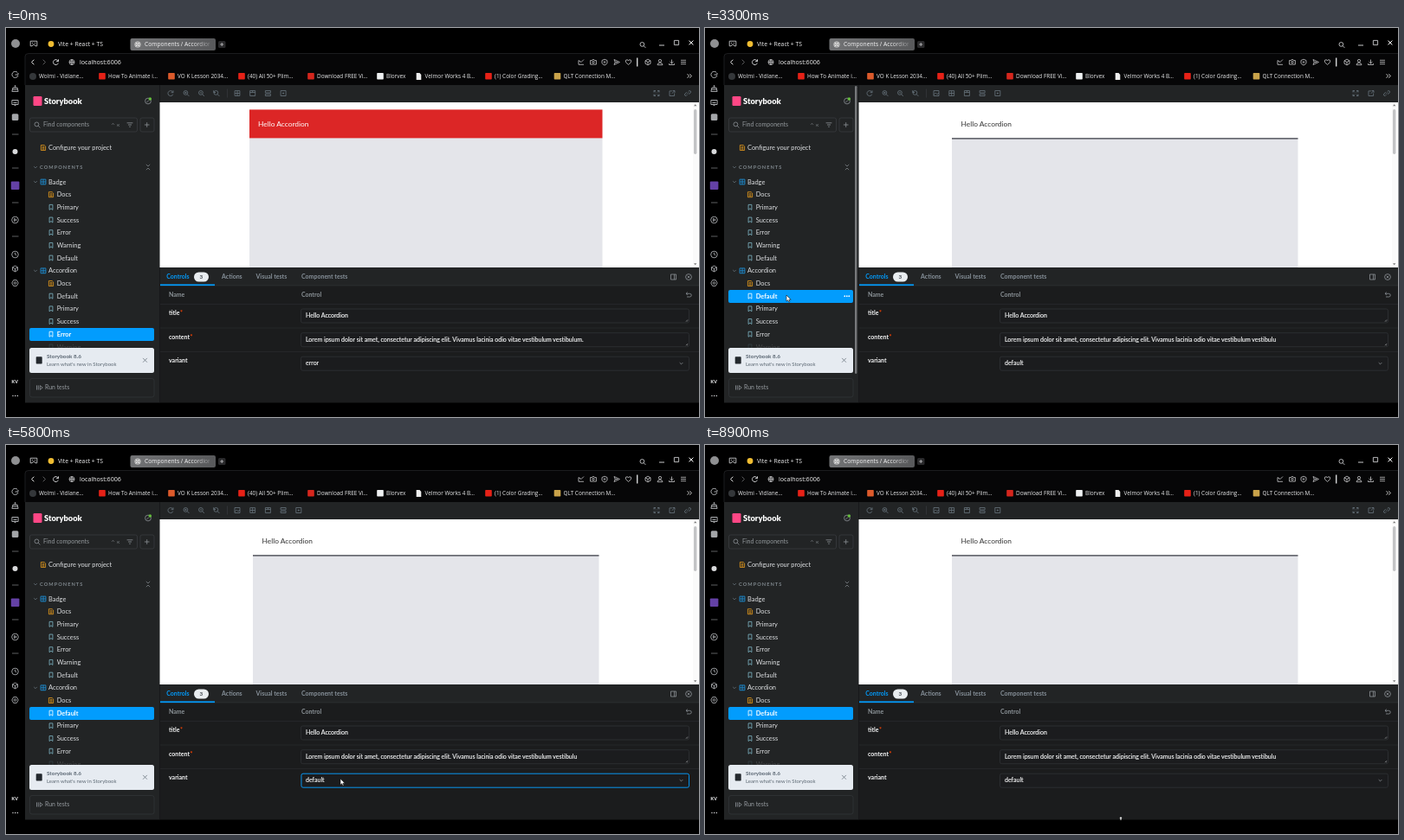
Write an HTML page that moves like this. It is 800x450 px and loops after 9 s.

```html
<!DOCTYPE html>
<html lang="en">
<head>
<meta charset="utf-8">
<title>Accordion stories</title>
<style>
html, body { margin: 0; width: 100%; height: 100%; overflow: hidden; background: #000; }
svg { display: block; width: 800px; height: 450px; font-family: Lato, "Open Sans", sans-serif; }
text { white-space: pre; }
.ui { font-family: "Open Sans", "Noto Sans", sans-serif; }
.b { font-weight: 700; }
.h { font-weight: 900; }
.m { stroke: #f4f5f6; stroke-width: .16px; }
.bar { animation: slide 9s infinite; }
.flash { animation: flash 9s infinite; }
.cursor { animation: move 9s infinite; }
@keyframes slide {
  0%, 71.4% { transform: translateY(21px); animation-timing-function: ease; }
  74.73%, 100% { transform: none; }
}
@keyframes flash {
  0%, 71.4% { fill: #14405f; animation-timing-function: ease; }
  93.6%, 100% { fill: #222425; }
}
</style>
</head>
<body>
<svg id="stage" viewBox="0 0 800 450" xmlns="http://www.w3.org/2000/svg"></svg>
<script>
const LOOP = 9000;
const BLUE = '#029cfd', GREY = '#8d9297', DIM = '#69757e', PANEL = '#222425', LINE = '#303336', WHITE = '#f4f5f6';

// Visible spans as start, end pairs in ms
const spans = {
  error: [0, 3100],
  story: [3100, 9000],
  plain: [3100, 6400, 8200, 9000],
  green: [6400, 8200],
  focus: [5700, 8200],
  urlHover: [1250, 1500],
  rowHover: [3000, 3800],
  scroll: [2700, 3900],
  tabHover: [4600, 5100],
  save: [6420, 8200],
  resetHover: [7650, 8200],
  arrow: [1000, 4450, 5150, 6250, 6750, 7600, 8250, 8750],
  hand: [4450, 5150, 7600, 8250],
  ibeam: [6250, 6750],
  upTip: [8750, 9000]
};

// Pointer stops: ms, x, y
const stops = [
  [0, 372, -12], [1000, 372, -12], [1400, 336.5, 52.5], [1800, 318, 78], [2950, 94, 309],
  [3500, 94, 309], [4600, 369, 286.5], [5000, 369, 286.5], [5550, 386, 386], [5900, 386, 386],
  [6350, 386, 352], [6700, 386, 352], [7700, 779, 426], [8200, 779, 426], [8800, 480, 431], [9000, 480, 431]
];

const pct = ms => (ms / LOOP * 100).toFixed(3) + '%';

function spanRule(name) {
  const marks = spans[name];
  let steps = marks[0] ? '0%{opacity:0}' : '';
  marks.forEach((ms, i) => { if (ms < LOOP) steps += `${pct(ms)}{opacity:${1 - i % 2}}`; });
  steps += `100%{opacity:${marks.at(-1) === LOOP ? 1 : 0}}`;
  return `@keyframes ${name}{${steps}} .${name}{animation:${name} 9s step-end infinite}`;
}

const moveRule = `@keyframes move{${stops.map(([ms, x, y]) =>
  `${pct(ms)}{transform:translate(${x}px,${y}px);animation-timing-function:ease-in-out}`).join('')}}`;

const style = document.createElement('style');
style.textContent = Object.keys(spans).map(spanRule).join('\n') + moveRule;
document.head.append(style);

const rect = (x, y, w, h, fill, r = 0, more = '') =>
  `<rect x="${x}" y="${y}" width="${w}" height="${h}" rx="${r}" fill="${fill}" ${more}/>`;
const box = (x, y, w, h, stroke, r = 2, fill = 'none') => rect(x, y, w, h, fill, r, `stroke="${stroke}" stroke-width=".8"`);
const dot = (x, y, r, fill) => `<circle cx="${x}" cy="${y}" r="${r}" fill="${fill}"/>`;
const text = (x, y, s, size, fill, cls = '', more = '') =>
  `<text x="${x}" y="${y + size * .34}" font-size="${size}" fill="${fill}" class="${cls}" ${more}>${s}</text>`;
const icon = (x, y, d, c = GREY, w = .8) =>
  `<path transform="translate(${x} ${y})" d="${d}" fill="none" stroke="${c}" stroke-width="${w}"/>`;
const group = (cls, ...parts) => `<g class="${cls}">${parts.join('')}</g>`;

const ring = r => `M${-r} 0a${r} ${r} 0 1 1 ${2 * r} 0a${r} ${r} 0 1 1 ${-2 * r} 0`;
const square = r => `M${-r} ${-r}H${r}V${r}H${-r}Z`;
const D = {
  lens: 'M-3 -.6a2.4 2.4 0 1 1 4.8 0a2.4 2.4 0 1 1 -4.8 0M1.2 1.2L3.4 3.4',
  reload: 'M2.8 -1A3 3 0 1 0 2.8 1.2M3 -3.2V-.8H.6',
  globe: ring(3) + 'M-3 0H3M0 -3Q-2.6 0 0 3Q2.6 0 0 -3',
  cross: 'M-2.4 -2.4L2.4 2.4M2.4 -2.4L-2.4 2.4',
  plus: 'M-2.8 0H2.8M0 -2.8V2.8',
  down: 'M-1.8 -.9L0 .9L1.8 -.9',
  grid: square(2.9) + 'M-2.9 0H2.9M0 -2.9V2.9',
  doc: 'M-2.6 -3H1.2L2.6 -1.6V3H-2.6ZM-1.3 -.9H1.3M-1.3 .4H1.3M-1.3 1.6H1.3',
  mark: 'M-1.9 -3H1.9V3L0 1.4L-1.9 3Z',
  frame: square(3) + 'M-3 -1H3M0 -3V-1',
  rows: 'M-3 -3H3V-.6H-3ZM-3 .8H3V3H-3Z',
  picture: square(3) + 'M-3 1.8L-.8 -.4L1 1.2L3 -.4',
  outline: square(3) + 'M-1 0H1M0 -1V1',
  cube: 'M0 -3.4L3 -1.7V1.7L0 3.4L-3 1.7V-1.7ZM-3 -1.7L0 0L3 -1.7M0 0V3.4',
  undo: 'M-1.2 -2.8L-3 -1.2L-1.2 .4M-3 -1.2H1.4A1.8 1.8 0 0 1 1.4 2.5H-2',
  expand: 'M-3 -3L-1 -1M3 -3L1 -1M-3 3L-1 1M3 3L1 1M-3 -1V-3H-1M3 -1V-3H1M-3 1V3H-1M3 1V3H1',
  open: 'M0 -2.6H-3V3H2.6V0M.6 -3H3V-.6M3 -3L-.4 .4',
  link: 'M-.6 1.8L-1.8 3A1.7 1.7 0 0 1 -3.4 .8L-1.2 -1.2M.6 -1.8L1.8 -3A1.7 1.7 0 0 1 3.4 -.8L1.2 1.2M-1 1L1 -1'
};

function browser() {
  const c = '#c9cacc';
  let s = rect(0, 0, 800, 450, '#000') + rect(22, 30, 778, 36, '#060607') +
    icon(0, 0, 'M22 66V33Q22 29.5 26 29.5H800', '#28292b', .7);

  // Tab strip
  s += dot(11, 18, 5, '#8f9092') + icon(32, 18, 'M-3.8 -2.8H3.8V2.8H1.8L.8 1.2H-.8L-1.8 2.8H-3.8ZM-2 -.6H-.8M1 -.6H2', c, .9) +
    dot(52, 18.5, 3.4, '#f0bd32') + text(60, 19, 'Vite + React + TS', 6.85, '#f0f0f1', 'ui') +
    rect(143.5, 12, 98.5, 14, 'url(#tab)', 2) + dot(152, 19, 3.5, '#f2f2f2') + icon(152, 19, D.globe, '#777', .5) +
    `<g clip-path="url(#tabClip)">${text(160, 19, 'Components / Accordion', 6.7, 'url(#fade)', 'ui')}</g>` +
    rect(245, 15, 8.5, 8, '#29292b', 1.5) + icon(249.2, 19, 'M-2 0H2M0 -2V2', c) +
    icon(735, 19.5, D.lens, c, .9) + icon(757, 19, 'M-3 1H3', c, 1) + icon(774, 17, square(2.6), c, .9) + icon(791, 17, D.cross, '#fff', 1);

  // Address row
  s += group('urlHover', rect(68, 32.5, 590, 13.5, '#141416', 3)) +
    icon(31, 39.5, 'M1.3 -2.8L-1.5 0L1.3 2.8', '#e2e2e2', 1) + icon(44, 39.5, 'M-1.3 -2.8L1.5 0L-1.3 2.8', '#68696b', .9) +
    icon(57.5, 39.5, D.reload, c, 1) + icon(76, 39.5, D.globe, c, .8) + text(85, 39.5, 'localhost:6006', 7.1, '#f6f6f6', 'ui');
  [[664, 'M-3 2.8V-2L0 0L3 -3M-3 2.8H3'], [678, 'M-3.4 -2H-1.4L-.8 -3H.8L1.4 -2H3.4V2.6H-3.4Z' + ring(1.2)],
   [691, 'M0 -3.3L3 -2V1Q2 3 0 3.5Q-2 3 -3 1V-2Z' + ring(.8)], [705, 'M-3 -3L3.4 0L-3 3L-1.8 0ZM-1.8 0H1'],
   [718.5, 'M0 3L-3 0Q-4 -3 -1.4 -2.8Q-.3 -2.5 0 -1.5Q.3 -2.5 1.4 -2.8Q4 -3 3 0Z'], [741, D.cube],
   [755, 'M-1.6 -1.6a1.6 1.6 0 1 1 3.2 0a1.6 1.6 0 1 1 -3.2 0M-3 3.2Q-2.6 .6 0 .6Q2.6 .6 3 3.2Z'],
   [768.5, 'M0 -3V1.4M-2 -.4L0 1.5L2 -.4M-3 1.6V3H3V1.6'], [782, 'M-3 -2.2H3M-3 0H3M-3 2.2H3']
  ].forEach(([x, d]) => s += icon(x, 39.5, d, c, .8));
  s += rect(728, 34.5, 1.4, 10, '#d5d6d8');

  // Bookmarks
  [[31, '#34373a', 'Wolmi - Vidlane...'], [111, '#e62117', 'How To Animate i...'], [191, '#dc5a2b', 'VO K Lesson 2034...'],
   [272, '#e62117', '(40) All 50+ Plim...'], [352, '#d5261d', 'Download FREE Vi...'], [432, '#eef0f1', 'Blorvex'],
   [476.5, '', 'Velmor Works 4 B...'], [557, '#e62117', '(1) Color Grading...'], [636.5, '#c9a34a', 'QLT Connection M...']
  ].forEach(([x, fill, label], i) => {
    s += !fill ? `<path d="M${x - 2.8} 52H${x + 1}L${x + 2.8} 54V60H${x - 2.8}Z" fill="#eee"/>`
      : i ? rect(x - 3.8, 52, 7.6, 7.6, fill, .8) : dot(x, 56, 4, fill);
    s += text(x + 7, 56, label, 6.4, '#e8e9ea', 'ui');
  });
  s += icon(789, 55.5, 'M-2.4 -2.2L-.4 0L-2.4 2.2M.4 -2.2L2.4 0L.4 2.2', '#ddd', .9);

  // Side strip
  const k = '#a9abae';
  s += icon(10.5, 54, 'M2.8 -2.4A3.6 3.6 0 1 0 3.5 1M0 0H3.5V-2', k, 1) +
    icon(10.5, 70, 'M0 -4V-1M-2.5 -1H2.5L3.6 3.4H-3.6ZM-3 1H3', k, 1) +
    icon(10.5, 86.5, 'M-3.6 -3H3.6V2H-3.6ZM-2 0H2M-1 2L0 3.6L1 2', k, 1) +
    rect(6.8, 99.3, 7.6, 7.6, '#a4a6a9', 1.5) + dot(10.5, 143, 3, '#d8d9db') + rect(5.8, 177.5, 9.6, 9.6, '#6441a5', 1) +
    icon(10.5, 222, ring(3.8) + 'M-1 -1.6L1.7 0L-1 1.6Z', k, .9) + icon(10.5, 262, ring(3.8) + 'M0 -2.2V0L1.7 1', k, .9) +
    icon(10.5, 278.5, D.cube, k, .9) + icon(10.5, 295, 'M-1.8 -3.4H1.8L3.7 0L1.8 3.4H-1.8L-3.7 0Z' + ring(1.3), k, .9) +
    text(6.3, 409, 'KV', 5.8, '#d4d5d7', 'ui b');
  [123, 162, 202, 241].forEach(y => s += rect(7, y - .4, 7.5, .8, '#77797c'));
  [8, 10.7, 13.4].forEach(x => s += dot(x, 425.5, .75, '#d0d1d3'));
  return s;
}

function row(i, label, kind, on) {
  const y = 178 + 14.69 * i;
  if (kind === 'group')
    return icon(34, y, D.down, DIM) + icon(43, y, D.grid, '#1c9ae8') + text(49, y, label, 7.45, '#dfe1e4');
  const tint = on ? '#fff' : kind === 'doc' ? '#e89b1b' : '#7fb9c8';
  return (on ? rect(27, Math.round(y - 7.2), 144, 15, BLUE, 2) : '') + icon(52, y, D[kind], tint) +
    text(58.7, y, label, 7.45, on ? '#fff' : '#dfe1e4', on ? 'b' : '');
}

function sidebar() {
  let s = rect(22, 66, 155.5, 367.5, PANEL) + rect(31.5, 79, 10, 11, '#ff4785', 1.2) + text(44, 84.5, 'Storybook', 9.3, '#fff', 'h') +
    icon(164, 84.5, ring(3.4) + 'M-1.5 1.5L1 -1', GREY) + dot(166.3, 82, 1.8, '#66bf3c');
  s += box(27.5, 104, 124, 16, '#393c3f') + box(155, 104, 16, 16, '#393c3f') + icon(36, 112, D.lens, GREY) +
    text(43, 112, 'Find components', 7, '#92979b') + icon(123.5, 111, 'M-1.4 .8L0 -.7L1.4 .8', GREY, .6) + text(128.3, 112, 'K', 4.6, GREY) +
    icon(143, 112, 'M-3.4 -2.2H3.4M-2 0H2M-.8 2.2H.8', GREY) + icon(162.7, 112, D.plus, GREY);
  s += icon(43, 138.5, D.doc, '#e89b1b') + text(49, 138.5, 'Configure your project', 7.45, '#dfe1e4') +
    icon(34, 161, D.down, DIM) + text(39, 161, 'COMPONENTS', 5.7, '#7f878d', 'b', 'letter-spacing="1"') +
    icon(164, 161, 'M-2.2 -3.2L0 -1L2.2 -3.2M-2.2 3.2L0 1L2.2 3.2', GREY, .7);

  const badge = ['Docs', 'Primary', 'Success', 'Error', 'Warning', 'Default'];
  const accordion = ['Docs', 'Default', 'Primary', 'Success', 'Error'];
  const kind = i => i ? 'mark' : 'doc';
  s += row(0, 'Badge', 'group') + badge.map((n, i) => row(i + 1, n, kind(i))).join('') +
    row(7, 'Accordion', 'group') + accordion.map((n, i) => row(i + 8, n, kind(i))).join('') +
    `<g opacity=".18">${row(13, 'Warning', 'mark')}</g>`;
  s += group('error', row(12, 'Error', 'mark', true)) + group('story', row(9, 'Default', 'mark', true)) +
    group('rowHover', ...[161.3, 163.8, 166.3].map(x => dot(x, 310.2, .85, '#fff'))) +
    group('scroll', rect(173, 67, 2.4, 333, '#77797b', 1.2));

  s += rect(27, 370, 144, 29, '#e6ebf1', 2.5) + rect(34.7, 380.2, 7, 8.3, '#23282d', .8) +
    text(47, 380, 'Storybook 8.6', 6.4, '#5a6672', 'b') + text(47, 389, 'Learn what\'s new in Storybook', 6, '#5c6873') +
    icon(160.5, 384.3, D.cross, '#6d7680', .8);
  s += box(27.5, 405.5, 143.5, 21.5, '#323538', 2.5, '#212324') +
    icon(38.5, 416, 'M-3 -2.6V2.6M-1.2 -2.6V2.6M.8 -2.4L3.8 0L.8 2.4Z', GREY) + text(45, 416, 'Run tests', 6.9, '#979ca1');
  return s + rect(177, 66, 1, 367.5, '#17181a');
}

const tools = list => list.map((name, i) => icon(267 + i * 17.7, 75.5, D[name], DIM)).join('');

function preview() {
  const card = (x, w) => rect(x, 127, w, 150, '#e4e5ea');
  const title = (x, fill) => text(x, 111.5, 'Hello Accordion', 8.4, fill);
  let s = rect(178, 66, 622, 20, PANEL) + icon(190, 75.5, D.reload, DIM) +
    icon(208, 75.5, D.lens + 'M-1.7 -.6H.5M-.6 -1.7V.5', DIM) + icon(225.5, 75.5, D.lens + 'M-1.7 -.6H.5', DIM) +
    icon(243, 75.5, D.lens + 'M-3.3 -3.3V-1H-1', DIM) + rect(255, 70.5, .7, 10, '#383b3e') +
    icon(751, 75.5, D.expand, DIM) + icon(769, 75.5, D.open, DIM) + icon(787, 75.5, D.link, DIM) +
    rect(177.5, 86, 622.5, 191, '#fff');
  s += group('error', tools(['grid', 'frame', 'rows', 'outline']), card(281, 407.5), rect(281, 94.4, 407.5, 33, '#dc2626'), title(291, '#fff')) +
    group('story', tools(['picture', 'grid', 'frame', 'rows', 'outline']), card(285, 399.5)) +
    group('plain', rect(285, 94, 399.5, 33.5, '#fff'), rect(285, 127.3, 399.5, 1.2, '#30323b'), title(295.5, '#333')) +
    group('green', rect(285, 94.4, 399.5, 33, '#17a34a'), title(295.5, '#fff'));
  return s + rect(793, 86, 5.5, 191, '#fafafa') + rect(794, 94, 3.4, 52, '#c3c4c6', 1.7) +
    '<path d="M794 90.3h3.4l-1.7-2zM794 272.3h3.4l-1.7 2z" fill="#777"/>';
}

function panel() {
  const field = (y, grip) => box(340.5, y, 448, 16, LINE, 2, '#1b1c1e') +
    (grip ? icon(787, y + 14.5, 'M-2 0L0 -2M-.8 0L0 -.8', '#b5b8ba', .6) : '');
  const value = (y, s) => text(346, y, s, 7, WHITE, 'm');
  const lorem = 'Lorem ipsum dolor sit amet, consectetur adipiscing elit. Vivamus lacinia odio vitae vestibulum vestibulu';
  let s = rect(178, 277, 622, 156.5, '#1b1c1d') + rect(178, 277, 622, 21, PANEL) + rect(178, 297.6, 622, .7, LINE) +
    text(185.3, 288, 'Controls', 6.95, BLUE, 'b') + rect(217, 282.5, 17, 11, '#e9edf0', 5.5) + text(223.6, 288, '3', 6.3, '#3b4248', 'b') +
    rect(178, 296.4, 63, 1.7, BLUE);
  [[249, 'Actions'], [288.5, 'Visual tests'], [341, 'Component tests']].forEach(([x, n]) => s += text(x, 288, n, 7, '#87919a', 'b'));
  s += group('tabHover', text(341, 288, 'Component tests', 7, '#2e8cc9', 'b')) + icon(770.5, 288, square(3) + 'M1 -3V3', GREY) +
    icon(788, 288, ring(3.4) + 'M-1.3 -1.3L1.3 1.3M1.3 -1.3L-1.3 1.3', GREY);
  s += text(188, 308.5, 'Name', 6.95, '#8d9499', 'b') + text(341, 308.5, 'Control', 6.95, '#8d9499', 'b') + icon(788, 308.5, D.undo, GREY);
  [319, 346.7, 374].forEach(y => s += rect(178, y, 622, .7, '#2a2c2f'));
  [[329.5, 'title', 201], [357.3, 'content', 212.5], [384.8, 'variant']].forEach(([y, n, star]) => {
    s += text(188, y, n, 7, WHITE, 'b') + (star ? text(star, y, '*', 7, '#ff4400', 'b') : '');
  });
  s += field(325, true) + field(352.7, true) + field(380.2) + value(333, 'Hello Accordion') +
    group('error', value(360.5, lorem + 'm.'), value(388, 'error')) + group('story', value(360.5, lorem)) +
    group('plain', value(388, 'default')) + group('green', value(388, 'success')) +
    group('focus', rect(341, 380.2, 447.5, 16, 'none', 2, `stroke="${BLUE}" stroke-width=".9"`)) + icon(779.5, 388, D.down, GREY);
  return s;
}

function saveBar() {
  const action = (x, label) => text(x, 423.7, label, 6.5, '#8f979e', 'b');
  const hover = group('resetHover', rect(760.5, 417, 32.5, 13.5, '#1b3547', 2), icon(767, 423.7, D.undo, BLUE),
    text(774, 423.7, 'Reset', 6.45, BLUE, 'b'));
  const bar = group('bar', rect(178, 413, 622, 21, PANEL, 0, 'class="flash"'), rect(178, 413, 622, .8, '#34383c'),
    text(188, 423.7, 'You modified this story. Do you want to save your changes?', 7.5, '#87919a'),
    icon(642, 423.7, 'M-3.2 .2L-1 2.2L3.2 -2.4', GREY), action(648, 'Update story'),
    icon(699, 423.7, ring(3.3) + 'M-1.6 0H1.6M0 -1.6V1.6', GREY), action(705, 'Create new story'),
    icon(767, 423.7, D.undo, GREY), action(774, 'Reset'), hover);
  return `<g clip-path="url(#panelClip)">${group('save', bar)}</g>` +
    group('resetHover', rect(750, 399, 41.5, 10.5, '#050506', 2), '<path d="M769 409h6l-3 2.5z" fill="#050506"/>',
      text(753, 404.3, 'Reset changes', 5.7, '#fff', 'b'));
}

function cursor() {
  const shape = (cls, d) => `<path class="${cls}" d="${d}" fill="#fff" stroke="#111" stroke-width=".6"/>`;
  return group('cursor',
    shape('arrow', 'M0 0V7.2L1.7 5.7L2.8 8.2L4 7.7L2.9 5.2H5.2Z'),
    shape('hand', 'M-.8 .6Q0 -.6 .8 .6V3.2L3.6 4Q4.3 4.3 4.1 5.5L3.5 8.6H-.7L-2.9 5.6Q-2.8 4.2 -.8 5.2Z'),
    '<path class="ibeam" d="M-1.5 -3.4H1.5M0 -3.4V3.4M-1.5 3.4H1.5" stroke="#e4e5e6" stroke-width=".8" fill="none"/>',
    '<path class="upTip" d="M0 -1L1.5 1H.5V3H-.5V1H-1.5Z" fill="#fff"/>');
}

const defs = `<defs>
  <linearGradient id="tab"><stop offset="0" stop-color="#727375"/><stop offset="1" stop-color="#58595b"/></linearGradient>
  <linearGradient id="fade" gradientUnits="userSpaceOnUse" x1="216" x2="237"><stop offset="0" stop-color="#f6f6f7"/><stop offset="1" stop-color="#77787a"/></linearGradient>
  <clipPath id="tabClip"><rect x="144" y="12" width="91" height="14"/></clipPath>
  <clipPath id="panelClip"><rect x="178" y="400" width="622" height="33.5"/></clipPath>
</defs>`;

document.getElementById('stage').innerHTML =
  defs + browser() + sidebar() + preview() + panel() + saveBar() + cursor();
</script>
</body>
</html>
```
